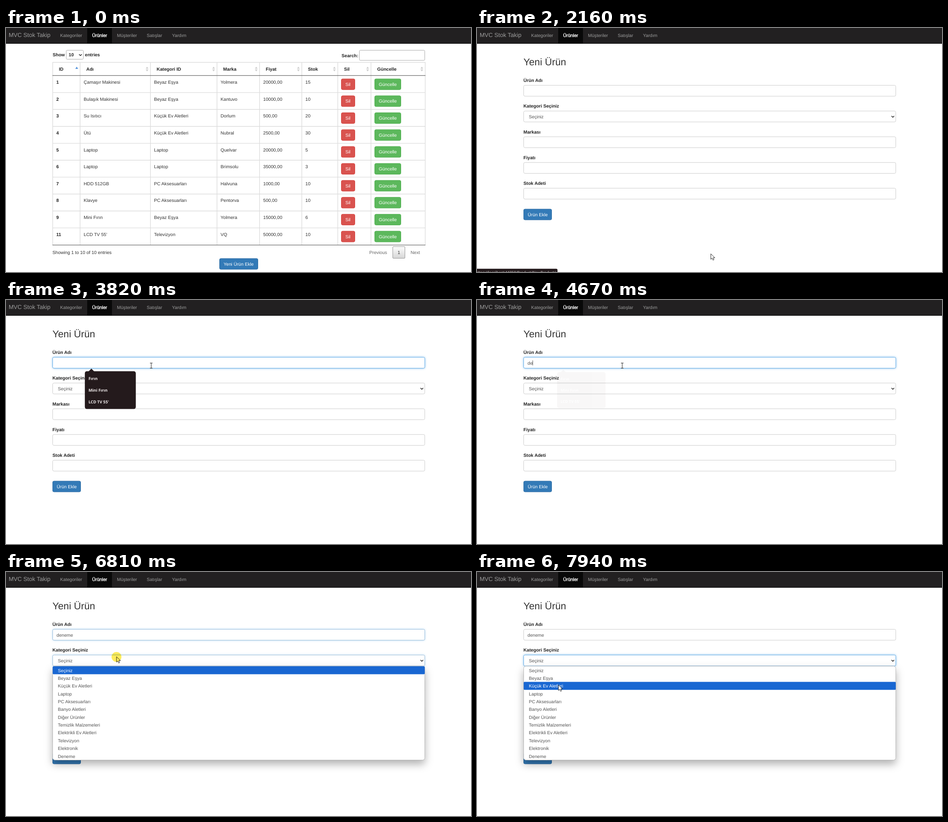
An HTML page for the animation above (8000 ms loop, 1031x543 px).

```html
<!DOCTYPE html>
<html lang="tr">
<head>
<meta charset="utf-8">
<style>
  html, body { margin: 0; width: 100%; height: 100%; overflow: hidden; background: #fff; }
  svg { display: block; font: 10.14px "Liberation Sans", Arial, sans-serif; text-rendering: geometricPrecision; }
  .bold { font-weight: bold; }
  .tip { font: 600 8.9px "Noto Sans", sans-serif; }
  .focus { fill: #fff; stroke: #66afe9; filter: drop-shadow(0 0 2.9px rgba(102, 175, 233, .75)); }
  #menu > .panel { filter: drop-shadow(0 9px 9px rgba(0, 0, 0, .3)); }
  #click { mix-blend-mode: multiply; }
</style>
</head>
<body>
<svg id="stage" width="1031" height="543" viewBox="0 0 1031 543"></svg>
<script>
const LOOP = 8000;
const stage = document.getElementById('stage');

// Text is placed by its left edge and the middle of its capitals.
const text = (x, y, str, fill = '#333', attrs = '') =>
  `<text x="${x}" y="${y + 3.6}" fill="${fill}" ${attrs}>${str}</text>`;
const bold = (x, y, str) => text(x, y, str, '#222', 'class="bold"');
const box = (x, y, w, h, fill, stroke = 'none', r = 0, attrs = '') =>
  `<rect x="${x}" y="${y}" width="${w}" height="${h}" rx="${r}" fill="${fill}" stroke="${stroke}" ${attrs}/>`;
const line = (x1, y1, x2, y2, stroke, width = 1.4) =>
  `<path d="M${x1} ${y1}L${x2} ${y2}" stroke="${stroke}" stroke-width="${width}"/>`;
const chevron = (x, y) =>
  `<path d="M${x - 3} ${y - 1.5}l3 3l3-3" fill="none" stroke="#222" stroke-width="1.5"/>`;
const button = (x, y, w, str, fill, stroke, pad = 9.5, attrs = '') =>
  box(x + .5, y + .5, w - 1, 24, fill, stroke, 2.9, attrs) + text(x + pad, y + 12.5, str, '#fff');

function navbar() {
  const links = [[120, 'Kategoriler'], [246, 'Müşteriler'], [312, 'Satışlar'], [368, 'Yardım']];
  return box(0, 0, 1031, 35, '#222021') + box(0, 34, 1031, 1, '#080808') + box(180, 0, 55, 34, '#080808') +
    text(6, 16.8, 'MVC Stok Takip', '#9d9d9d', 'font-size="13.04"') +
    links.map(([x, s]) => text(x, 16, s, '#9d9d9d')).join('') +
    text(191, 16, 'Ürünler', '#fff', 'stroke="#fff" stroke-width=".4"');
}

const columns = [[103.5, 'ID'], [164.3, 'Adı'], [320.3, 'Kategori ID'], [467.8, 'Marka'],
  [562.3, 'Fiyat'], [655.8, 'Stok'], [735.6, 'Sil'], [809.3, 'Güncelle'], [929.5]];
const products = [
  '1|Çamaşır Makinesi|Beyaz Eşya|Yolmera|20000,00|15',
  '2|Bulaşık Makinesi|Beyaz Eşya|Kantuvo|10000,00|10',
  '3|Su Isıtıcı|Küçük Ev Aletleri|Dorlum|500,00|20',
  '4|Ütü|Küçük Ev Aletleri|Nubral|2500,00|30',
  '5|Laptop|Laptop|Quelvar|20000,00|5',
  '6|Laptop|Laptop|Brimsolu|35000,00|3',
  '7|HDD 512GB|PC Aksesuarları|Halvuna|1000,00|10',
  '8|Klavye|PC Aksesuarları|Pentorva|500,00|10',
  '9|Mini Fırın|Beyaz Eşya|Yolmera|15000,00|6',
  '11|LCD TV 55\'|Televizyon|VQ|50000,00|10'
];

function sortIcon(x, active) {
  return active
    ? `<path d="M${x - 3.2} 91l3.2-5l3.2 5z" fill="#5a97dd"/>`
    : `<path d="M${x - 3} 90.5l3-4.5l3 4.5zm0 1.8h6l-3 4.5z" fill="#cfcfcf"/>`;
}

function tablePage() {
  const rowY = i => 106 + 37.65 * i;
  let out = bold(103.5, 59.5, 'Show') + box(133.5, 49.5, 38, 20, '#fff', '#aaa', 2.2) +
    bold(139, 59.5, '10') + chevron(165, 60) + bold(175, 59.5, 'entries') +
    bold(744, 61, 'Search:') + box(783.5, 49.5, 145, 22.5, '#fff', '#aaa', 2.2);
  out += line(103, 76.5, 930, 76.5, '#ddd');
  columns.forEach(([x, name], i) => {
    out += line(x, 76, x, 483, '#ddd');
    if (name) out += bold(x + 13.8, 91.3, name) + sortIcon(columns[i + 1][0] - 7.5, i === 0);
  });
  products.forEach((row, i) => {
    const y = rowY(i);
    if (i) out += line(103, y, 930, y, '#ddd');
    row.split('|').forEach((cell, c) => {
      const x = columns[c][0] + 8;
      out += c ? text(x, y + 14.3, cell) : bold(x, y + 14.3, cell);
    });
    out += button(743, y + 6.7, 31, 'Sil', '#d9534f', '#d43f3a') +
      button(817, y + 6.7, 59, 'Güncelle', '#5cb85c', '#4cae4c');
  });
  return out + line(103, 105.8, 930, 105.8, '#444', 1.1) + line(103, 483, 930, 483, '#444', 1.1) +
    text(103, 499, 'Showing 1 to 10 of 10 entries') + text(805.5, 499.3, 'Previous', '#666') +
    box(857.5, 486.5, 27, 26, 'url(#page)', '#979797', 1.5) + text(868.2, 499.3, '1') +
    text(897, 499.3, 'Next', '#666') +
    button(473, 512.5, 86, 'Yeni Ürün Ekle', '#337ab7', '#2e6da4') +
    `<g id="hover">${button(473, 512.5, 86, 'Yeni Ürün Ekle', '#286090', '#204d74')}</g>`;
}

const fieldY = i => 127.5 + 57.25 * i;
const field = (i, attrs = '') => box(103.5, fieldY(i), 825, 24.3, '#fff', '#ccc', 2.9, attrs);

function formPage() {
  const labels = ['Ürün Adı', 'Kategori Seçiniz', 'Markası', 'Fiyatı', 'Stok Adeti'];
  return `<text x="103" y="83" font-size="21.73" fill="#333">Yeni Ürün</text>` +
    labels.map((s, i) => bold(103, fieldY(i) - 10.9, s) + field(i)).join('') +
    field(0, 'class="focus" id="nameFocus"') + field(1, 'class="focus" id="kindFocus"') +
    text(112, 140, '', '#555', 'id="typed"') + box(112, 134.5, .8, 11, '#222', 'none', 0, 'id="caret"') +
    text(115, 197, 'Seçiniz', '#555') + chevron(922, 197.3) +
    button(103, 402.5, 63, 'Ürün Ekle', '#337ab7', '#2e6da4');
}

const suggestions = () => `<path d="M183 159l6.3-6.3l6.3 6.3z" fill="#241a1c"/>` +
  box(174.8, 158.5, 113, 84, '#241a1c', 'none', 4.5) +
  ['Fırın', 'Mini Fırın', 'LCD TV 55\''].map((s, i) =>
    text(183, 174.6 + 26 * i, s, '#f3eeee', 'class="tip"')).join('');

const options = ['Seçiniz', 'Beyaz Eşya', 'Küçük Ev Aletleri', 'Laptop', 'PC Aksesuarları', 'Banyo Aletleri',
  'Diğer Ürünler', 'Temizlik Malzemeleri', 'Elektrikli Ev Aletleri', 'Televizyon', 'Elektronik', 'Deneme'];
const OPTION_H = 17.36;
const menu = () => box(103.5, 209.5, 825, 209, '#fff', '#aaa', 5, 'class="panel" stroke-width=".8"') +
  box(103.5, 209.8, 825, OPTION_H + .3, '#1967d2', 'none', 2, 'id="picked"') +
  options.map((s, i) => text(115, 219 + OPTION_H * i, s, '#555', 'class="option"')).join('');

const statusBar = () => box(-5, 535.8, 183.5, 20, '#241a1c', 'none', 3) +
  `<text x="-4" y="546.5" fill="#d8d0d2" style="font:8.4px 'Noto Sans',sans-serif">https://localhost:44359/Product/NewProduct/</text>`;

const cursors = `
  <path id="arrow" d="M0 0v12.2l2.8-2.6l2 4.5l2.2-1l-2-4.3h4z" fill="#fff" stroke="#111" stroke-width=".9"/>
  <path id="beam" d="M-2.7-5.6h2.1l.6.5l.6-.5h2.1M0-5.2v10.4M-2.7 5.6h2.1l.6-.5l.6.5h2.1" fill="none" stroke="#333" stroke-width="1.1"/>
  <path id="hand" d="M-1.4 1a1.4 1.4 0 0 1 2.8 0v5.2l1-.3q1 0 1.2.8q1.6-.5 2 .6q1.9-.4 2 1.2v3.5q0 2-1.2 3.2v2h-7v-1.7q-2-2.2-3.9-5.6q.2-1.7 1.9-.7l1.2 1.4z" fill="#fff" stroke="#111" stroke-width=".9"/>`;

stage.innerHTML = `
  <defs><linearGradient id="page" x2="0" y2="1"><stop stop-color="#fdfdfd"/><stop offset="1" stop-color="#d6d6d6"/></linearGradient></defs>
  ${navbar()}
  <g id="table">${tablePage()}</g>
  <g id="form">${formPage()}</g>
  <g id="tips">${suggestions()}</g>
  <g id="menu">${menu()}</g>
  <g id="status">${statusBar()}</g>
  <g id="pointer">${cursors}</g>
  <circle id="click" r="11" fill="#ffec5c"/>`;

const el = {};
stage.querySelectorAll('[id]').forEach(n => el[n.id] = n);
const optionTexts = stage.querySelectorAll('.option');

const ramp = (t, a, b) => Math.min(1, Math.max(0, (t - a) / (b - a)));
const ease = p => p * p * (3 - 2 * p);
const within = (t, a, b) => t >= a && t < b;
const show = (node, on) => node.style.display = on ? '' : 'none';
const fade = (node, p) => { show(node, p > 0); node.style.opacity = p; };

// Pointer moves: start, end, target.
const moves = [[930, 1270, 529.5, 524], [2100, 2450, 392, 258], [2630, 3130, 322, 146],
  [5970, 6590, 245, 188.5], [7130, 7940, 180.5, 251.5]];
const keys = [[4530, 'd'], [4670, 'e'], [4970, 'n'], [5140, 'e'], [5360, 'm'], [5500, 'e']];
const clicks = [[1720, 1790], [3360, 3430], [6740, 6900]];

function pointerAt(t) {
  let x = 543, y = 546;
  for (const [a, b, tx, ty] of moves) {
    const p = ease(ramp(t, a, b));
    x += (tx - x) * p;
    y += (ty - y) * p;
  }
  return [x, y];
}

function draw(t) {
  const onForm = t >= 1860, menuOpen = t >= 6800;
  const [x, y] = pointerAt(t);
  show(el.table, !onForm);
  show(el.form, onForm);
  fade(el.hover, ramp(t, 1050, 1220));
  fade(el.status, ramp(t, 1400, 1560) * (1 - ramp(t, 2160, 2400)));

  fade(el.nameFocus, ramp(t, 3350, 3500) * (1 - ramp(t, 6740, 6890)));
  fade(el.kindFocus, ramp(t, 6740, 6890));
  el.typed.textContent = keys.filter(k => t >= k[0]).map(k => k[1]).join('');
  show(el.caret, within(t, 3360, 3820) || within(t, 4370, 6030));
  if (onForm) el.caret.setAttribute('x', 112 + el.typed.getComputedTextLength());

  const tips = ramp(t, 3420, 3580) * (1 - ramp(t, 4530, 4675));
  fade(el.tips, tips);
  const s = .95 + .05 * tips;
  el.tips.setAttribute('transform', `translate(231 200) scale(${s}) translate(-231 -200)`);

  show(el.menu, menuOpen);
  const picked = Math.max(0, Math.floor((y - 210) / OPTION_H));
  el.picked.setAttribute('y', 209.8 + OPTION_H * picked);
  optionTexts.forEach((n, i) => n.setAttribute('fill', i === picked ? '#fff' : '#555'));

  const overInput = onForm && !menuOpen && x > 103 && x < 929 &&
    [0, 2, 3, 4].some(i => within(y, fieldY(i), fieldY(i) + 24.3));
  const overButton = !onForm && y < 537.5;
  el.pointer.setAttribute('transform', `translate(${x} ${y})`);
  show(el.pointer, t >= 990);
  show(el.beam, overInput);
  show(el.hand, overButton);
  show(el.arrow, !overInput && !overButton);
  el.click.setAttribute('cx', x);
  el.click.setAttribute('cy', y + .5);
  show(el.click, clicks.some(([a, b]) => within(t, a, b)));
}

const start = performance.now();
function tick() {
  draw((performance.now() - start) % LOOP);
  requestAnimationFrame(tick);
}
tick();
</script>
</body>
</html>
```
